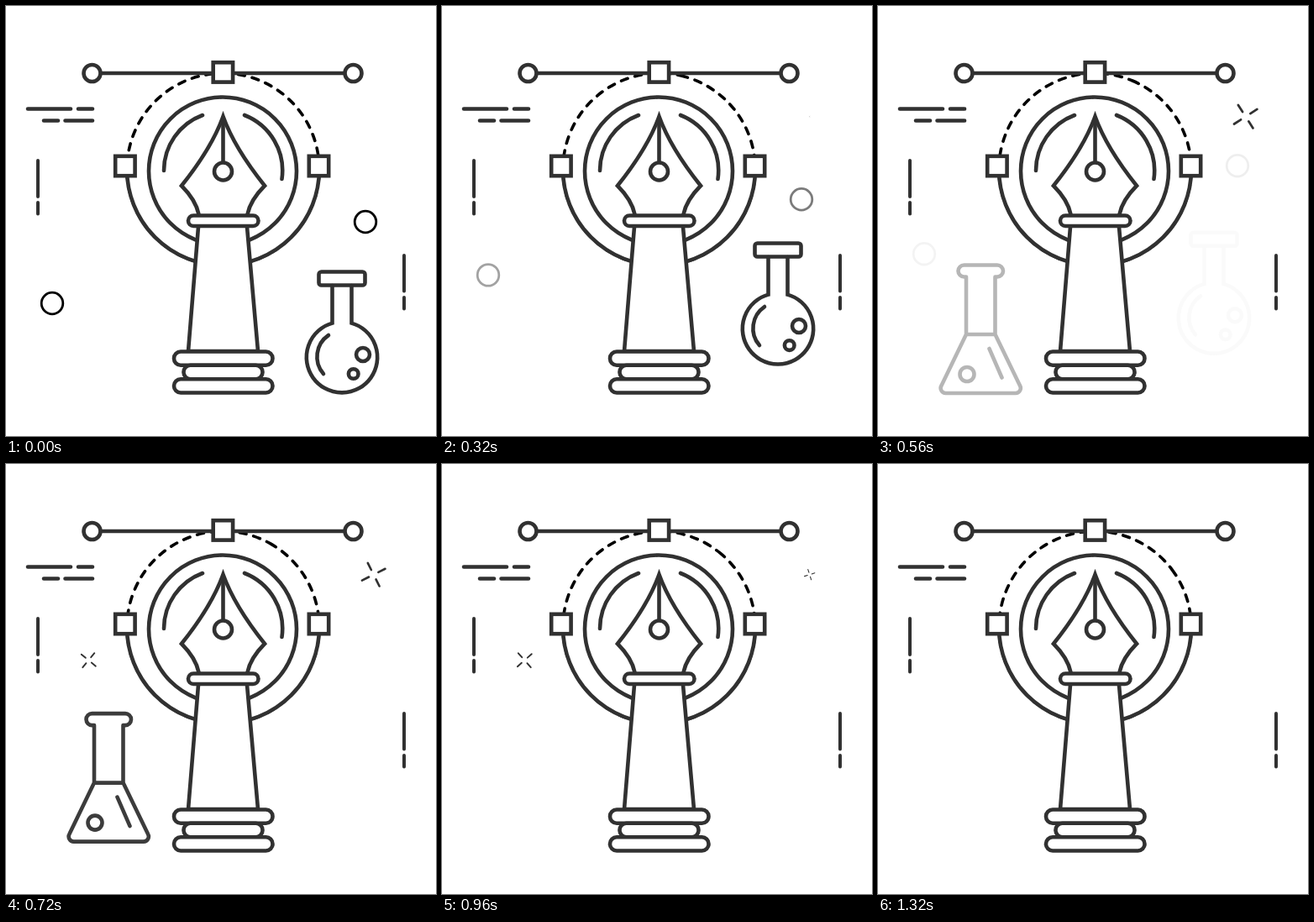
Animation of 512x512 px, one loop 1480 ms. Source, as an HTML page:

```html
<!DOCTYPE html>
<html lang="en">
<head>
<meta charset="utf-8">
<title>Pen tool</title>
<style>
  html, body { margin: 0; height: 100%; overflow: hidden; background: #fff; }
  svg { display: block; width: 100vw; height: 100vh; }
</style>
</head>
<body>
<svg viewBox="0 0 512 512" fill="none" stroke="#313131" stroke-width="4.6" stroke-linecap="round">
  <circle id="dashes" cx="258.5" cy="194.5" r="114.5" stroke="#000" stroke-width="3.6" stroke-dasharray="8 9"/>
  <path fill="#fff" d="M144 194.5A114.5 114.5 0 0 0 373 194.5"/>
  <circle cx="258" cy="196.5" r="88" fill="#fff"/>
  <path d="M188 196A70.5 70.5 0 0 1 234 130M284 130A71 71 0 0 1 328.5 206"/>

  <!-- handles -->
  <path d="M113 80H404"/>
  <g fill="#fff">
    <circle cx="102.5" cy="80" r="10"/>
    <circle cx="413.5" cy="80" r="10"/>
    <rect x="246.7" y="67.2" width="23.4" height="23.4"/>
    <rect x="130.2" y="178.8" width="23.4" height="23.4"/>
    <rect x="360.8" y="178.8" width="23.4" height="23.4"/>
  </g>

  <!-- pen -->
  <g fill="#fff">
    <path d="M229 263L217 411H300L287 263"/>
    <path stroke-miterlimit="8" d="M229.5 248C227 236 219 224 209 214C233 184 249 158 258.5 131.5C268 158 284 184 308 214C298 224 290 236 287.5 248"/>
    <path d="M258.5 133V187"/>
    <circle cx="258.5" cy="197" r="10.5"/>
    <rect x="217" y="249.5" width="83.5" height="12.5" rx="6.2"/>
    <rect x="200" y="411.5" width="117.5" height="16.3" rx="8"/>
    <rect x="211.5" y="427.8" width="94" height="16.4" rx="8"/>
    <rect x="200" y="444.2" width="117.5" height="16.3" rx="8"/>
  </g>

  <path d="M26 122.5H77M86 122.5H103M45 136.5H62M70.500 136.5H103"/>
  <path stroke-width="4" d="M38 184V227M38 234V247.500M474 297V339.500M474 347V360.500"/>

  <g id="roundFlask">
    <rect x="372.5" y="316.5" width="55" height="16" rx="3"/>
    <path d="M388.500 333V377.600A42.200 42.200 0 1 0 411.500 377.600V333M384 392A31 31 0 0 0 378 438"/>
    <circle cx="425" cy="415" r="8"/>
    <circle cx="413.7" cy="438" r="5.8"/>
  </g>
  <g id="coneFlask" stroke-linejoin="round">
    <path d="M105 391V322.500H102.500a7 7 0 0 1 0-14H142a7 7 0 0 1 0 14H139.500V391H105L75.500 452a6 6 0 0 0 5.500 9H163.500a6 6 0 0 0 5.500-9L139.500 391M132.500 408L147.500 442.500"/>
    <circle cx="106" cy="438.500" r="8.5"/>
  </g>
  <g stroke="#000" stroke-width="2.8">
    <circle id="leftBubble" cx="55" cy="354" r="12.8"/>
    <circle id="rightBubble" cx="428" cy="257" r="12.8"/>
  </g>
  <g stroke-width="2.9">
    <path id="rightSpark" d="M7 0H17M-7 0H-17M0 7V17M0-7V-17"/>
    <path id="leftSpark" d="M7 0H17M-7 0H-17M0 7V17M0-7V-17"/>
  </g>
</svg>
<script>
const LOOP = 1480, STEP = 40, LAST = 1320;
const el = id => document.getElementById(id);
const ramp = (t, from, to) => Math.min(1, Math.max(0, (t - from) / (to - from)));

function place(id, transform, opacity = 1) {
  el(id).setAttribute('transform', transform);
  el(id).setAttribute('opacity', opacity);
}

function bubble(id, t, start, end, rise) {
  const p = ramp(t, start, end);
  place(id, `translate(0 ${-rise * p})`, 1 - p ** 0.72);
}

function spark(id, t, x, y, [start, peak, end], size, angle) {
  const scale = size * Math.min(ramp(t, start, peak), 1 - ramp(t, peak, end));
  place(id, `translate(${x} ${y}) rotate(${angle + t * 0.038}) scale(${scale})`, scale > 0 ? 1 : 0);
}

function draw(t) {
  place('dashes', `rotate(${t * 0.04 - 89.5} 258.5 194.5)`);
  place('roundFlask', `translate(0 ${-46.7 * ramp(t, 0, 440)})`, 1 - ramp(t, 320, 565));
  place('coneFlask', `translate(0 ${-0.0714 * Math.max(0, t - 560)})`,
    Math.min(ramp(t, 480, 710), 1 - ramp(t, 710, 890)));
  bubble('leftBubble', t, 0, 600, 63);
  bubble('rightBubble', t, 160, 600, 73.5);
  spark('rightSpark', t, 437.7, 131.7, [310, 610, 1130], 1.15, -54);
  spark('leftSpark', t, 98.3, 233.7, [575, 810, 1216], 1.05, 12);
}

function tick(now) {
  const t = now % LOOP;
  draw(Math.min(LAST, Math.floor(t / STEP) * STEP));
  requestAnimationFrame(tick);
}
draw(0);
requestAnimationFrame(tick);
</script>
</body>
</html>
```
